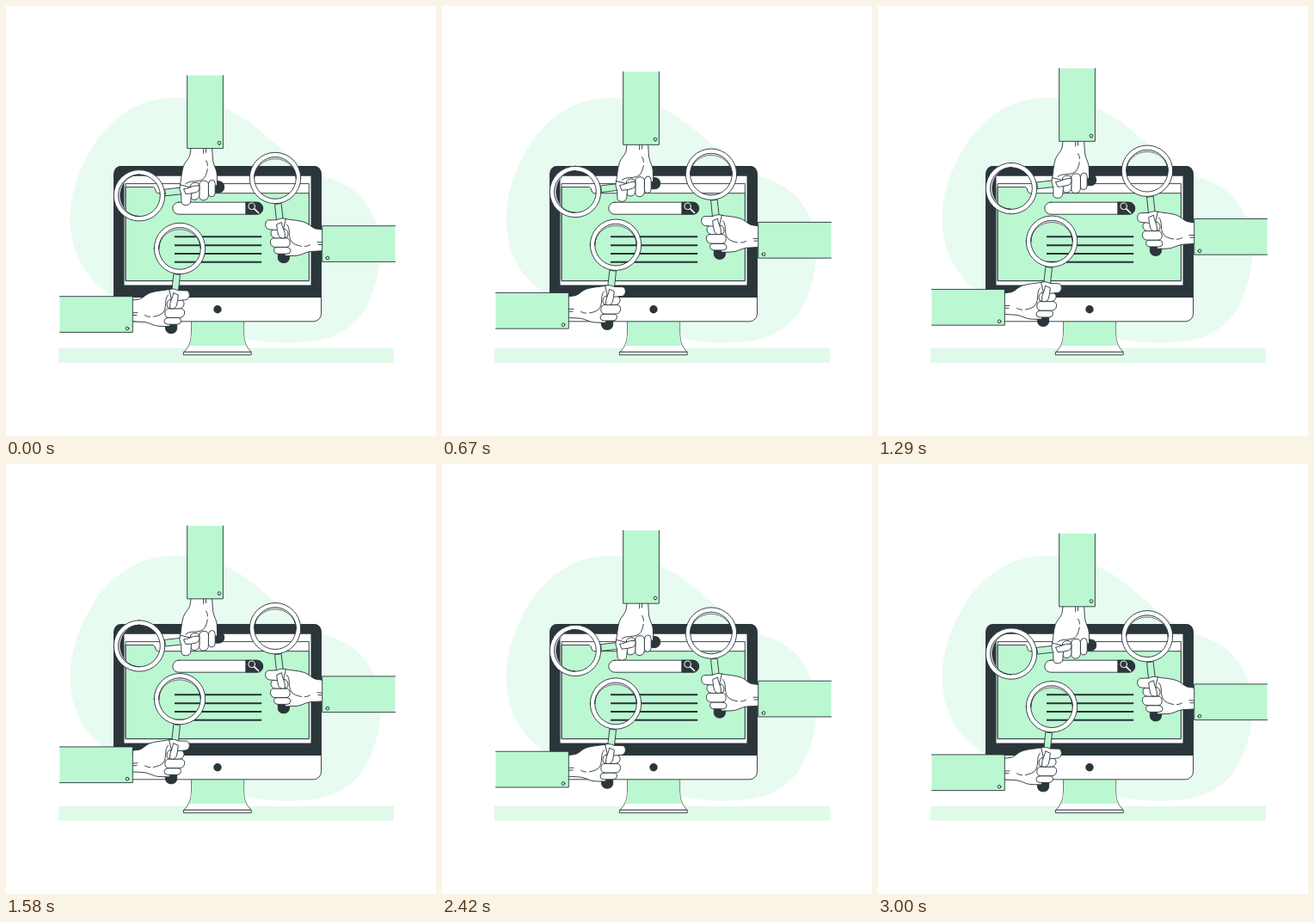
These frames come from a looping animation (500 px wide and 500 px high, 3040 ms). An HTML page:

```html
<!DOCTYPE html>
<html lang="en">
<head>
<meta charset="utf-8">
<title>Search</title>
<style>
  html, body { margin: 0; width: 100%; height: 100%; overflow: hidden; background: #fff; }
  svg { display: block; width: 100vw; height: 100vh; }
  .ink { stroke: #263238; stroke-width: .9; stroke-linecap: round; stroke-linejoin: round; }
  .thin { stroke-width: .7; }
  .line { fill: none; }
  .white { fill: #fff; }
  .green { fill: #bbf7d1; }
  .dark { fill: #2b363b; }
</style>
</head>
<body>
<svg viewBox="0 0 500 500">
  <defs>
    <!-- Arm reaching in from the left with a magnifier; reused mirrored and transposed -->
    <g id="arm">
      <path class="white ink" fill-rule="evenodd" d="M172.300 282a29.700 29.700 0 1 0 59.400 0a29.700 29.700 0 1 0-59.400 0z
        M177.700 282a24.300 24.300 0 1 0 48.600 0a24.300 24.300 0 1 0-48.600 0z"/>
      <path class="white ink thin" d="M177.700 282A24.300 24.300 0 0 1 226.300 282A24.300 22.300 0 0 0 177.700 282z"/>
      <path class="green ink" d="M195.300 311.500Q199 312.600 202.500 312.200L198.500 350L191 349z"/>
      <path class="dark ink" d="M185.400 369H198.700V375Q198 380.700 192 380.700Q185.600 380.500 185.400 374z"/>

      <path class="white" d="M147.500 342L155 341C160 339.500 162 335.500 168 333.300C176 330.700 184 331 190 329.500L194 343L190 372L178 372.300C172 372.300 168 368.500 161 367.500L147.500 366.700z"/>
      <path class="line ink" d="M147.500 342L155 341C160 339.500 162 335.500 168 333.300C176 330.700 184 331 190 329.500
        M147.500 366.700L161 367.500C168 368.500 172 372.300 178 372.300L186 372.600
        M147.500 356.700H153M147.500 359.500H152
        M188.500 336C183.500 341 187.500 350 183 356C180.500 359 177 360.200 171.500 361.300M167.500 361.500Q164 361.400 161.500 359.700"/>
      <path class="white ink" d="M188 362.500H200Q204 363 203.300 367Q202.600 370.200 199 370.200H188Q184 370 184 366.400Q184.300 362.800 188 362.500z"/>
      <path class="white ink" d="M189 351.700H203Q208 352.300 207.600 357Q207 362.200 202 362.400H189Q184.700 362 184.800 357Q185.300 352 189 351.700z"/>
      <path class="white ink" d="M191 341.500H202Q207.500 342 207 347Q206 351.700 201 351.900H191Q187 351.600 187 347Q187.300 342 191 341.500z"/>
      <path class="white ink" d="M190 329.500C194 328.300 197 329.200 200 330.700L210.500 331Q213.700 332 213.400 336.500Q212.700 341.500 208.500 341.800L199.800 342.500L193 342z"/>
      <path class="white ink" d="M190.500 351Q190.300 345 192.500 341Q194.500 336 194.500 333.500L200.300 336Q199.800 343 198.300 348.500Q197 352 193.500 352Q191 352.200 190.500 351z"/>

      <path class="green" d="M62.500 337.700H147.300V379.400H62.500z"/>
      <path class="line ink" d="M62.500 337.700H147.300V379.400H62.500" stroke-linecap="butt"/>
      <circle class="line ink" cx="141" cy="375" r="1.900"/>
    </g>
  </defs>

  <path fill="#e8fbf0" d="M196 107C155 106 120 130 98 168C80 200 72 232 75 258C79 298 98 322 128 340C170 360 208 361 241 375
    C278 391 324 395 362 389C404 381 420 354 428 328C437 303 439 272 427 244C415 216 390 203 366 197C334 184 308 152 274 129C248 113 222 107 196 107z"/>
  <path fill="#dffae9" d="M61 398H451V414.700H61z"/>

  <!-- Stand -->
  <path class="white ink thin" d="M215.500 366V380C215.200 392 212.500 396 207 402.300H285C279.500 396 276.900 392 276.600 380V366z"/>
  <path class="green" d="M215.900 366V380Q215.700 389 213 395H279Q276.400 389 276.200 380V366z"/>
  <path class="white ink" d="M206.800 402.300H285.200V405.700H206.800z"/>

  <!-- Monitor -->
  <rect class="white ink" x="125.500" y="186.500" width="241" height="180.300" rx="9"/>
  <path class="dark" d="M125.300 339V195.500Q125.300 186 134.500 186H357.500Q366.800 186 366.800 195.500V339z"/>
  <path class="white" d="M137.500 197.800H354.500V324.600H137.500z"/>
  <circle class="dark" cx="246" cy="352.800" r="4.700"/>

  <!-- Browser window -->
  <path class="white ink" d="M139.500 206.600H352.300V319.600H139.500z"/>
  <path class="green ink" d="M139.500 210.500H171.500Q173 211 173.700 214Q174.300 217.500 176.500 217.700H352.300V319.600H139.500z"/>
  <rect class="white ink" x="193.800" y="228.200" width="105" height="14" rx="7"/>
  <path class="dark" d="M278.300 227.800H291.600A7.400 7.400 0 0 1 291.600 242.600H278.300z"/>
  <g fill="none" stroke="#fff" stroke-linecap="round">
    <circle cx="285.600" cy="232.800" r="3.800"/>
    <path d="M288.700 235.900L293.600 240.500" stroke-width="1.700"/>
  </g>
  <path class="line" stroke="#263238" stroke-width="2" d="M196 268.200H297.200M196 278.200H297.200M196 288H297.200M196 297.800H297.200"/>

  <g id="arms">
    <use href="#arm" transform="matrix(0 1 1 0 -127 18.300)"/>
    <use href="#arm" transform="matrix(-1 0 0 1 515 -82)"/>
    <use href="#arm"/>
  </g>
</svg>
<script>
  const LOOP = 3040, LEAD = 40, LOW = 0.25, RISE = 9.7;
  const arms = document.getElementById('arms');
  const start = performance.now();

  // Steady rise for half the loop, then a steady fall
  function draw() {
    const phase = (performance.now() - start + LEAD) % LOOP / LOOP;
    const y = LOW - RISE * (1 - Math.abs(2 * phase - 1));
    arms.setAttribute('transform', `translate(0 ${y.toFixed(3)})`);
    requestAnimationFrame(draw);
  }
  draw();
</script>
</body>
</html>
```
